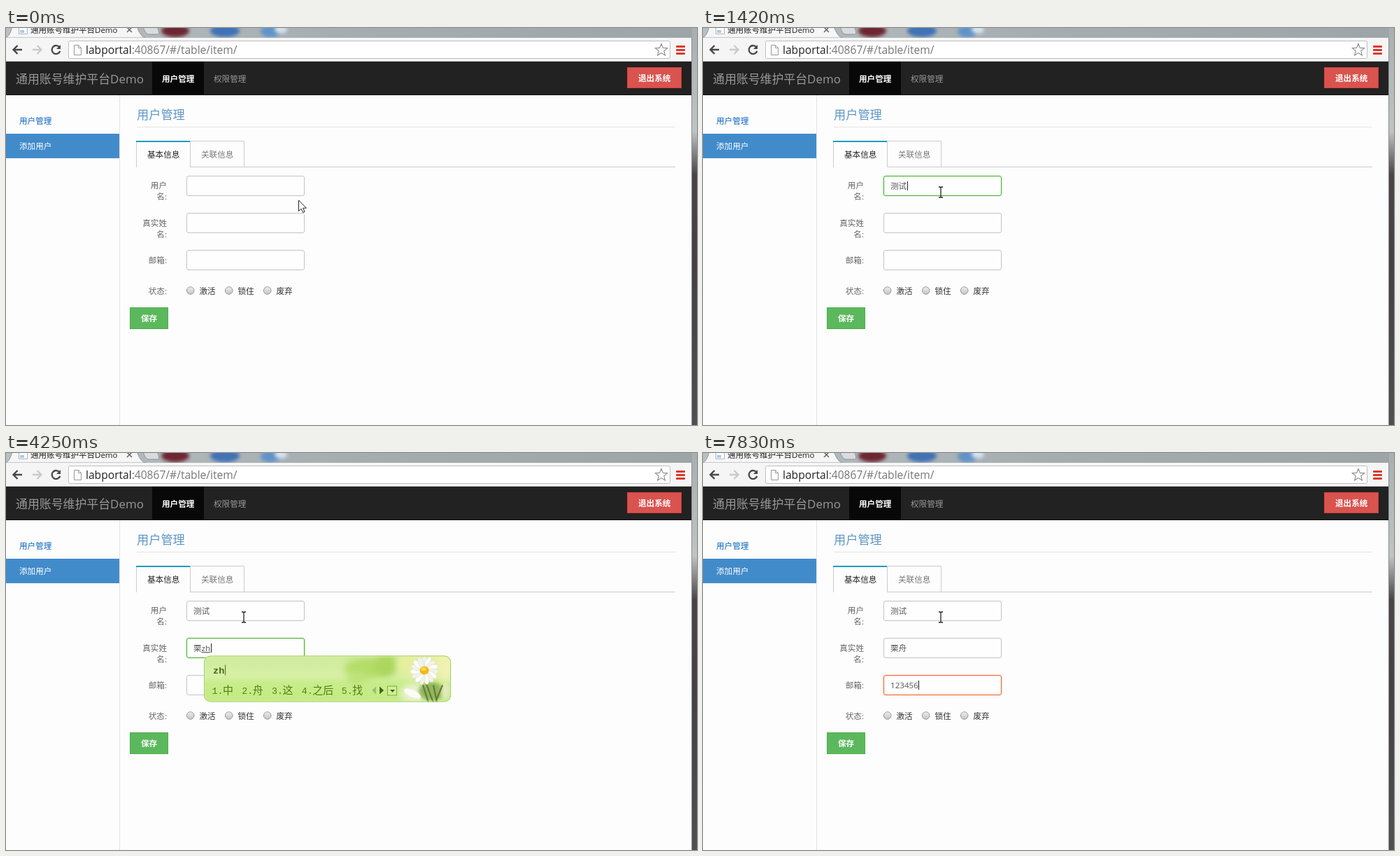
Write an HTML page that moves like this. It is 988x567 px and loops after 8000 ms.

```html
<!DOCTYPE html>
<html lang="zh-CN">
<head>
<meta charset="utf-8">
<title>用户管理</title>
<style>
  html, body { margin: 0; width: 100%; height: 100%; overflow: hidden; background: #fdfdfd; }
  svg { display: block; width: 988px; height: 567px; }
  text { font-family: "Open Sans", "Noto Sans CJK SC", "Noto Sans CJK", sans-serif; white-space: pre; }
  .mono { font-family: "Liberation Mono", monospace; }
</style>
</head>
<body>
<svg viewBox="0 0 988 567">
  <defs>
    <filter id="soft" x="-50%" y="-50%" width="200%" height="200%"><feGaussianBlur stdDeviation="2.5"/></filter>
    <filter id="haze" x="-80%" y="-80%" width="260%" height="260%"><feGaussianBlur stdDeviation="5"/></filter>
    <linearGradient id="glass"><stop offset="0" stop-color="#b9c0c3"/><stop offset=".5" stop-color="#a5adb1"/><stop offset="1" stop-color="#9ea5a9"/></linearGradient>
    <linearGradient id="edge" x2="0" y2="1"><stop offset="0" stop-color="#a9aeb1"/><stop offset=".26" stop-color="#bfc3c6"/><stop offset=".37" stop-color="#4a4447"/><stop offset=".6" stop-color="#454044"/><stop offset="1" stop-color="#504e53"/></linearGradient>
    <linearGradient id="lime" x2="0" y2="1"><stop offset="0" stop-color="#cfeb9d"/><stop offset=".45" stop-color="#d6f0a5"/><stop offset=".6" stop-color="#c8ec8b"/><stop offset="1" stop-color="#c3ea84"/></linearGradient>
    <linearGradient id="knob" x2="0" y2="1"><stop offset="0" stop-color="#eee"/><stop offset="1" stop-color="#c4c4c4"/></linearGradient>
    <clipPath id="strip"><rect width="981" height="14"/></clipPath>
  </defs>
  <g id="page"></g>
  <g id="live"></g>
</svg>
<script>
const page = document.getElementById('page');
const live = document.getElementById('live');
const LOOP = 8000, EM = 11.6;

const rect = (x, y, w, h, fill, more = '') =>
  `<rect x="${x}" y="${y}" width="${w}" height="${h}" fill="${fill}" ${more}/>`;
const path = (d, stroke, width = 1, fill = 'none') =>
  `<path d="${d}" stroke="${stroke}" stroke-width="${width}" fill="${fill}"/>`;
const text = (x, y, str, fill = '#333', size = EM, more = '') =>
  `<text x="${x}" y="${y}" fill="${fill}" font-size="${size}" ${more}>${str}</text>`;
const blob = (x, y, rx, ry, fill, more = 'filter="url(#soft)"') =>
  `<ellipse cx="${x}" cy="${y}" rx="${rx}" ry="${ry}" fill="${fill}" ${more}/>`;
const haze = (x, y, rx, ry, fill) => blob(x, y, rx, ry, fill, 'filter="url(#haze)"');

function browser() {
  const strip = rect(0, 0, 981, 14, 'url(#glass)') +
    blob(242, 4, 20, 9, '#6d2630') + blob(313, 4, 21, 9, '#3f72b5') +
    blob(378, 5, 14, 8, '#5f92cb') + blob(393, 2, 9, 6, '#d5e3ee') +
    path('M196-2H216Q221 9 217 9H204Q199 9 196-2Z', '#8d9497', 1, '#d9dcde') +
    path('M-2 14Q5 14 9-2H187Q193 14 200 14Z', '#90979a', 1, '#f6f6f6') +
    path('M18.5-4H27L30.5 0V8.5H18.5Z', '#a9b6c4', 1, '#fff') + rect(20, 3, 6, 4, '#a8cbea') +
    text(35, 7, '通用账号维护平台Demo', '#222', 11.5) +
    path('M173-1L180 6M180-1L173 6', '#666', 1.5);
  return `<g clip-path="url(#strip)">${strip}</g>` +
    rect(0, 14, 981, 34, '#f5f5f5') + rect(0, 47, 981, 1, '#c4c4c4') +
    rect(89.5, 18.5, 860, 25, '#fff', 'stroke="#bfbfbf" rx="2"') +
    path('M23 31H11M16.5 25L10.5 31L16.5 37', '#484848', 2.4) +
    path('M38 31H50M44.5 25L50.5 31L44.5 37', '#cacaca', 2.4) +
    path('M76.5 27.5A6 6 0 1 0 77.3 33', '#484848', 2.3) +
    path('M78 24V30H72Z', 'none', 0, '#484848') +
    path('M97.5 24.5H103.5L107.5 28.5V38.5H97.5ZM103.5 24.5V28.5H107.5', '#999', 1, '#fff') +
    text(114, 36.5, 'labportal<tspan fill="#777">:40867/#/table/item/</tspan>', '#222', 15.6) +
    path('M937 22.5L939.4 28.4L945.6 28.8L940.8 32.8L942.4 39L937 35.6L931.6 39L933.2 32.8L928.4 28.8L934.6 28.4Z', '#8a8a8a', 1.1, '#fff') +
    [25, 30, 35].map(y => rect(958, y, 13, 3, '#d93a31', 'rx="1"')).join('');
}

function frame() {
  const bold = 'font-weight="600"';
  return rect(0, 0, 988, 567, '#fdfdfd') + browser() +
    rect(0, 48, 981, 48, '#222') + rect(209, 48, 74, 48, '#080808') + rect(0, 95, 981, 1, '#0c0c0c') +
    text(14, 78.5, '通用账号维护平台Demo', '#999', 16.9) +
    text(223, 77, '用户管理', '#fff', EM, bold) + text(297, 77, '权限管理', '#999') +
    rect(888.5, 56.5, 77, 29, '#d9534f', 'stroke="#d43f3a"') + text(904, 76, '退出系统', '#fff', EM, bold) +
    rect(162, 96, 1, 471, '#e4e4e4') + rect(0, 151, 162, 35, '#428bca') +
    text(19, 137, '用户管理', '#0a64c0') + text(19, 172.5, '添加用户', '#fff') +
    text(187, 130, '用户管理', '#5f97c6', 17.2) + rect(187, 141, 770, 1, '#e5e5e5') +
    path('M263.5 198.5H957M186.5 199V161M263.5 199V161.5H340.5V198', '#ccc') +
    rect(186, 161, 77, 2, '#1c9cbf') +
    text(202, 184.5, '基本信息', '#222') + text(279, 184.5, '关联信息', '#777') +
    [[229, '用户'], [245, '名:'], [282.5, '真实姓'], [298.5, '名:'], [335.5, '邮箱:'], [379.5, '状态:']]
      .map(([y, s]) => text(230, y, s, '#666', EM, 'text-anchor="end"')).join('') +
    ['激活', '锁住', '废弃'].map((s, i) =>
      blob(263.7 + 55 * i, 375, 5.3, 5.3, 'url(#knob)', 'stroke="#999"') + text(276.5 + 55 * i, 380, s)).join('') +
    rect(177.5, 399.5, 54, 30, '#5cb85c', 'stroke="#4cae4c"') + text(193, 418.7, '保存', '#fff', EM, bold) +
    rect(980, 14, 1, 553, '#8b8e90') + rect(981, 0, 7, 567, 'url(#edge)');
}

function daisy(x, y) {
  let petals = '';
  for (let a = 0; a < 360; a += 24)
    petals += blob(x, y - 12.5, 3.8, 8, a % 48 ? '#fff' : '#f1f3ea',
      `stroke="#d3dbbd" stroke-width=".5" transform="rotate(${a} ${x} ${y})"`);
  return petals + blob(x, y, 6.5, 6, '#f1b91c', '') + blob(x - 1, y - 2, 3.5, 2.5, '#f9d951', '');
}

// Soft photo tones at the right end of the candidate window.
function meadow(w) {
  return haze(w - 120, 18, 32, 15, '#b4dd68') + haze(w - 93, 14, 17, 16, '#acd75d') +
    haze(w - 135, 32, 14, 10, '#bde27a') + haze(w - 40, 12, 38, 22, '#e6ef9e') +
    haze(w - 6, 14, 14, 22, '#f0f2b2') + haze(w - 52, 54, 20, 14, '#eaf2d4') +
    blob(w - 28, 51, 18, 13, '#93b45a') + blob(w - 8, 50, 6, 12, '#e3eabc') +
    path(`M${w - 40} 42L${w - 32} 67M${w - 35} 40Q${w - 31} 52 ${w - 25} 67M${w - 12} 42L${w - 22} 66M${w - 25} 42L${w - 20} 66`, '#5d7f37', 2.2) +
    blob(w - 55, 54, 13, 5, '#fbfcf5', `transform="rotate(25 ${w - 55} 54)"`) + daisy(w - 38, 21);
}

// Candidate window, stretched to fit its words; the right part stays right-aligned.
function panel(x, y, pinyin, words) {
  const w = 339 + 14 * (words.replace(/ /g, '').length - 5);
  const ink = '#4f7f16';
  let at = 11.5, cands = '';
  words.split(' ').forEach((word, i) => {
    cands += text(at, 54.5, `${i + 1}.`, ink, 13.3, 'class="mono"') + text(at + 15.5, 54.5, word, ink, 15);
    at += 42.7 + 14.3 * (word.length - 1);
  });
  return `<g transform="translate(${x} ${y})">
    <clipPath id="card"><rect width="${w}" height="66" rx="9"/></clipPath>
    <g clip-path="url(#card)">${rect(0, 0, w, 66, 'url(#lime)')}${meadow(w)}</g>` +
    rect(.5, .5, w - 1, 65, 'none', 'rx="9" stroke="#96cb52"') +
    rect(1.5, 1.5, w - 3, 63, 'none', 'rx="8" stroke="#eff9d6" stroke-opacity=".5"') +
    text(13, 25, pinyin, '#456c12', 13.5, `class="mono" font-weight="${pinyin.length > 1 ? 700 : 400}" id="pinyin"`) +
    rect(0, 13, 1, 15, '#456c12', 'id="mark"') + cands +
    path(`M${w - 107} 44V55L${w - 113} 49.5Z`, 'none', 0, '#a0bd6c') +
    path(`M${w - 102} 44V55L${w - 96} 49.5Z`, 'none', 0, '#3c6510') +
    rect(w - 90.5, 43.5, 13, 13, '#d0ee98', 'stroke="#7fab45"') +
    path(`M${w - 87} 48.5H${w - 80}L${w - 83.5} 52.5Z`, 'none', 0, '#3c6510') + '</g>';
}

function pointer([x, y, beam]) {
  return beam
    ? path(`M${x - 3} ${y - 7}H${x - 1}L${x} ${y - 6}L${x + 1} ${y - 7}H${x + 3}M${x} ${y - 6}V${y + 7}M${x - 3} ${y + 8}H${x - 1}L${x} ${y + 7}L${x + 1} ${y + 8}H${x + 3}`, '#222', 1.3)
    : path(`M${x} ${y}V${y + 15.5}L${x + 3.6} ${y + 12.2}L${x + 6.2} ${y + 17.5}L${x + 8.6} ${y + 16.4}L${x + 6.2} ${y + 11.2}H${x + 11}Z`, '#222', 1, '#fff');
}

const BLUE = '#5fa9e4', GREEN = '#36ab1c', RED = '#f4511e';
// Each step changes only the listed properties.
const steps = [
  [0, { mouse: [418.5, 246, 0], focus: -1, a: '', b: '', c: '', ink: BLUE, caret: 1, py: '', words: '' }],
  [120, { mouse: [398, 243, 0] }],
  [250, { mouse: [368, 235, 1] }],
  [390, { mouse: [350, 234, 1] }],
  [520, { mouse: [340, 234, 1] }],
  [650, { focus: 0 }],
  [780, { py: 'c', words: '层 从 陈 才 成' }],
  [930, { py: 'ce', words: '测 策 侧 册 厕' }],
  [1180, { py: 'ces', words: '测试 侧视 侧室 策士 测试的' }],
  [1300, { py: 'cesh' }],
  [1420, { py: '', a: '测试', ink: GREEN }],
  [2010, { caret: 0 }],
  [2470, { focus: 1, ink: BLUE, caret: 1 }],
  [2880, { caret: 0 }],
  [3430, { caret: 1 }],
  [3550, { py: 'l', words: '来 了 拉 老 李' }],
  [3700, { py: 'li', words: '栗 里 理 利 莉' }],
  [3980, { py: '', b: '栗', ink: GREEN }],
  [4120, { py: 'z', words: '在 做 再 最 自' }],
  [4250, { py: 'zh', words: '中 舟 这 之后 找' }],
  [4370, { py: 'zho', words: '中 舟 周 之后 州' }],
  [4520, { py: '', b: '栗舟' }],
  [4670, { focus: 2, ink: BLUE }],
  [5200, { caret: 0 }],
  [5480, { c: '1', ink: RED, caret: 1 }],
  [5630, { c: '12' }],
  [6190, { caret: 0 }],
  [6320, { c: '1', caret: 1 }],
  [6460, { c: '' }],
  [6740, { c: '1' }],
  [6920, { c: '12' }],
  [7100, { c: '123' }],
  [7280, { c: '1234' }],
  [7550, { c: '12345' }],
  [7830, { c: '123456' }]
];
let last = {};
const states = steps.map(([, change]) => last = { ...last, ...change });

function draw(s) {
  const values = [s.a, s.b, s.c];
  let out = values.map((value, i) => {
    const y = 211.5 + 53 * i, on = i === s.focus;
    const typed = on && s.py ? `<tspan text-decoration="underline">${s.py}</tspan>` : '';
    return rect(258.5, y, 168, 28, '#fefefe', `rx="2.5" stroke="${on ? s.ink : '#c4c4c4'}"`) +
      text(268, y + 18.7, value + typed, '#555', EM, `id="field${i}"`) +
      (on && s.caret ? rect(268, y + 7.5, 1, 13, '#222', 'id="caret"') : '');
  }).join('');
  if (s.py) out += panel(271.5 + EM * values[s.focus].length, 236.5 + 53 * s.focus, s.py, s.words);
  live.innerHTML = out + pointer(s.mouse);

  const follow = (id, label, x) => {
    const bar = document.getElementById(id);
    if (bar) bar.setAttribute('x', Math.ceil(x + document.getElementById(label).getComputedTextLength()));
  };
  follow('caret', 'field' + s.focus, 268);
  follow('mark', 'pinyin', 13);
}

page.innerHTML = frame();
const start = performance.now();
let shown = -1;
function tick() {
  const t = (performance.now() - start) % LOOP;
  let i = steps.length - 1;
  while (steps[i][0] > t) i--;
  if (i !== shown) draw(states[shown = i]);
  requestAnimationFrame(tick);
}
tick();
</script>
</body>
</html>
```
